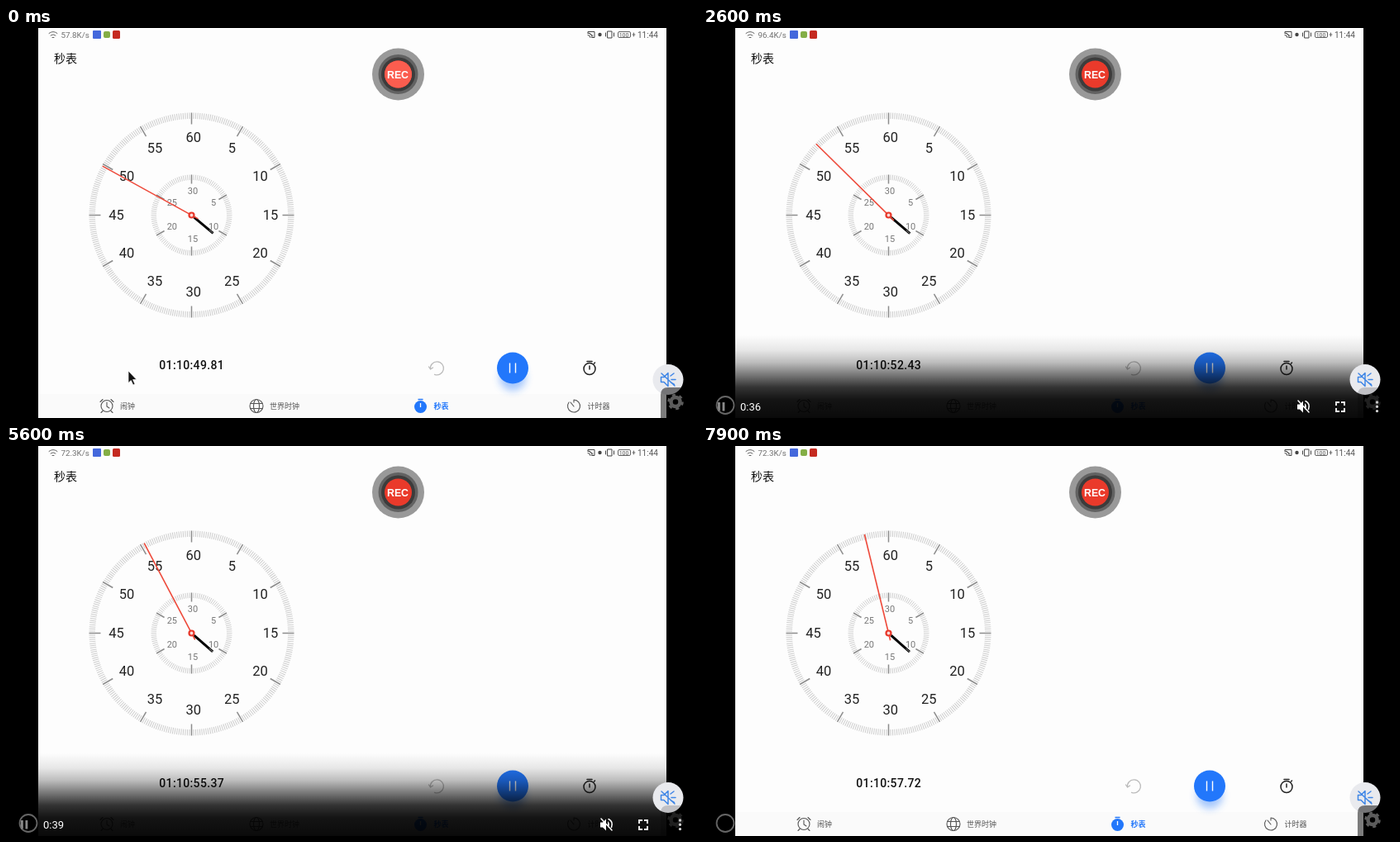
Animation, 836 px wide and 472 px high, one loop 8000 ms. Source, as an HTML page:

```html
<!DOCTYPE html>
<html lang="zh-CN">
<head>
<meta charset="utf-8">
<title>秒表</title>
<style>
html, body { margin: 0; width: 100%; height: 100%; overflow: hidden; background: #000; }
svg { display: block; width: 836px; height: 472px; font-family: Roboto, "Noto Sans CJK SC", sans-serif; }
.cjk { font-family: "Noto Sans CJK SC", "Noto Sans CJK", sans-serif; }
.mid { text-anchor: middle; }
.line { fill: none; stroke-linecap: round; stroke-linejoin: round; }
</style>
</head>
<body>
<svg viewBox="0 0 836 472">
  <defs>
    <linearGradient id="shade" x1="0" y1="0" x2="0" y2="1">
      <stop offset="0" stop-opacity="0"/>
      <stop offset=".18" stop-opacity=".09"/>
      <stop offset=".33" stop-opacity=".26"/>
      <stop offset=".48" stop-opacity=".53"/>
      <stop offset=".63" stop-opacity=".8"/>
      <stop offset=".78" stop-opacity=".92"/>
      <stop offset="1" stop-opacity=".96"/>
    </linearGradient>
    <filter id="blur" x="-50%" y="-50%" width="200%" height="200%"><feGaussianBlur stdDeviation="5"/></filter>
  </defs>
  <rect x="39" width="760" height="472" fill="#fdfdfd"/>
  <rect x="39" y="443" width="760" height="29" fill="#fafafa"/>

  <!-- status bar -->
  <g class="line" stroke="#666">
    <path d="M52 6.5q5-4 10 0M54 9q3-2.6 6 0"/>
    <path d="M56 11.5h2"/>
    <path d="M704 6V4.500h8v7h-3M704 8.500q3 0 3 3M704 6.300q5 0 5 5M706 6.500l4 3" stroke="#444"/>
    <path d="M728 4h5v8h-5zM725.500 6v4M735.500 6v4" stroke="#444"/>
    <rect x="740.500" y="4.500" width="15" height="7" rx="1.500"/>
    <path d="M759.500 6v4M758 8h3"/>
  </g>
  <circle cx="718.500" cy="8" r="2.200" fill="#444"/>
  <text x="741.700" y="11" font-size="7" fill="#555">100</text>
  <text id="speed" x="66.500" y="12" font-size="9.800" fill="#707070"></text>
  <rect x="105" y="3" width="10" height="10" rx="1" fill="#4468dc"/>
  <rect x="118" y="4" width="8" height="8" rx="2" fill="#84ae46"/>
  <rect x="129" y="3" width="9" height="10" rx="1.500" fill="#c52a20"/>
  <text x="764" y="12" font-size="10" fill="#555">11:44</text>

  <text class="cjk" x="58" y="42" font-size="14" font-weight="500" fill="#111">秒表</text>

  <!-- record badge -->
  <circle cx="474.500" cy="56" r="31.500" fill="#999"/>
  <circle cx="474.500" cy="56" r="24" fill="#626262"/>
  <circle cx="474.500" cy="56" r="20.500" fill="#3c3c3c"/>
  <circle cx="474.500" cy="56" r="16.500" fill="#ea3a2b"/>
  <circle id="glow" cx="474.500" cy="56" r="16.500" fill="#fb5d4f"/>
  <text class="mid" x="474" y="60.600" font-size="12.300" font-weight="700" fill="#fff" style="font-family:'Liberation Sans',sans-serif">REC</text>

  <!-- dial -->
  <g id="dial"></g>
  <g transform="translate(224.500 226.500)">
    <g id="minute"><path d="M0-4V-34" stroke="#000" stroke-width="3"/><path d="M0-28V-34" stroke="#777" stroke-width="1"/></g>
    <path id="second" d="M0 9V-123" stroke="#ee4a3b" stroke-width="1.600"/>
    <circle r="3" fill="#fbd9d6" stroke="#e8382b" stroke-width="2.200"/>
  </g>
  <text id="clock" class="mid" x="224.700" y="413" font-size="14" font-weight="500" letter-spacing=".35" fill="#111"></text>

  <!-- buttons -->
  <g class="line" stroke="#bbb" stroke-width="1.300">
    <path d="M513.500 413a8 8 0 1 1 5 6.300M511.500 410l2 3 3-2"/>
  </g>
  <circle cx="613" cy="423" r="16" fill="#2277fb" opacity=".4" filter="url(#blur)"/>
  <circle cx="613" cy="411.500" r="19" fill="#2277fb"/>
  <path d="M609.500 405.500v12M616.500 405.500v12" stroke="#fff" stroke-width="1.400"/>
  <g class="line" stroke="#222" stroke-width="1.500">
    <circle cx="706" cy="412.500" r="7"/><path d="M703 403.500h6M706 409v4M711.500 406l1-1"/>
  </g>

  <!-- tabs -->
  <g class="line" stroke="#555" stroke-width="1.100">
    <circle cx="122" cy="457.500" r="7"/><path d="M122 453v5l3 2M114 452.500l3-3M130 452.500l-3-3M117 463.500l-2 2M127 463.500l2 2"/>
    <circle cx="303" cy="457.500" r="8"/><ellipse cx="303" cy="457.500" rx="3.500" ry="8"/><path d="M296 454.500h14M296 460.500h14"/>
    <path d="M687 450a7.500 7.500 0 1 1-6 3M687 450v3M683 453l4 5"/>
  </g>
  <circle cx="501.500" cy="458.500" r="7.500" fill="#2277fb"/>
  <path d="M498.500 449.500h6" stroke="#2277fb" stroke-width="1.500"/>
  <path d="M501.500 454v5" stroke="#fff" stroke-width="1.300"/>
  <g class="cjk" font-size="9" fill="#555">
    <text x="138" y="461.300">闹钟</text><text x="319" y="461.300">世界时钟</text><text x="703.500" y="461.300">计时器</text>
    <text x="517.500" y="461.300" fill="#2277fb" font-weight="700">秒表</text>
  </g>

  <!-- player controls -->
  <g id="controls">
    <rect y="372" width="836" height="100" fill="url(#shade)"/>
    <path id="toggle" fill="#fff"/>
    <text id="played" x="45" y="463" font-size="13" fill="#fff"></text>
    <path d="M719 455.500h3l4-4v14l-4-4h-3zM728 454q4 4 0 8z" fill="#fff"/>
    <path class="line" d="M729 451.500q6 3 3.500 10M720 451l13 14" stroke="#fff" stroke-width="1.500"/>
    <path d="M766 457v-4h4M772 453h4v4M776 460v4h-4M770 464h-4v-4" fill="none" stroke="#fff" stroke-width="1.800"/>
    <path d="M815.500 453v.01M815.500 458.300v.01M815.500 463.600v.01" stroke="#fff" stroke-width="3.400" stroke-linecap="round"/>
  </g>

  <!-- floating buttons -->
  <circle cx="801" cy="425.500" r="18.500" fill="#e9eaee"/>
  <g class="line" stroke="#3f86e6" stroke-width="1.500">
    <path d="M792.500 422.500h3.500l5-5v16l-5-5h-3.500zM793 418l16 15M804 421l4-3M805 425.500h5M804.500 429l4 2.500"/>
  </g>
  <g id="gear">
    <path d="M792 472V444q0-9 9-9h35v37z" fill="#000" opacity=".5"/>
    <circle cx="810" cy="452.500" r="5.500" fill="none" stroke="#5c5c5c" stroke-width="4.500"/>
    <circle cx="810" cy="452.500" r="8.300" fill="none" stroke="#5c5c5c" stroke-width="3" stroke-dasharray="4 4.690"/>
  </g>

  <!-- pointer -->
  <path id="arrow" d="M0 0V14.500L3.300 11.500 5.800 17 8 16 5.500 10.600H10z" fill="#111" stroke="#fff" stroke-width=".7"/>
  <circle id="ripple" fill="none" stroke="#777" stroke-width="1.500"/>
  <circle id="ring" fill="#000" fill-opacity=".46" stroke="#787878" stroke-opacity=".85" stroke-width="1.800"/>
</svg>
<script>
const LOOP = 8000;
const $ = id => document.getElementById(id);
const set = (id, attrs) => { for (const k in attrs) $(id).setAttribute(k, attrs[k]); };

function dial(cx, cy, r, inner, major, ticks, tickWidth, num) {
  let out = '';
  for (let i = 0; i < ticks; i++) {
    const big = i % (ticks / num.count) === 0;
    out += `<path d="M0 ${-r}V${big ? -major : -inner}" stroke="${big ? '#8c8c8c' : '#cdcdcd'}"
      stroke-width="${big ? 1.5 : tickWidth}" transform="translate(${cx} ${cy}) rotate(${i * 360 / ticks})"/>`;
  }
  for (let i = 1; i <= num.count; i++) {
    const a = i * 2 * Math.PI / num.count;
    out += `<text class="mid" x="${num.x + num.r * Math.sin(a)}" y="${num.y - num.r * Math.cos(a) + num.size * .36}"
      font-size="${num.size}" fill="${num.fill}">${i * 5}</text>`;
  }
  return out;
}
$('dial').innerHTML =
  dial(224.5, 226.5, 124, 116.5, 110, 300, 1, { count: 12, x: 226.7, y: 225.7, r: 93.3, size: 16.5, fill: '#222' }) +
  dial(224.5, 226.5, 49, 42.5, 38, 120, .9, { count: 6, x: 226, y: 226, r: 29, size: 11, fill: '#777' });

// keys: [seconds, value...], linear in between
function at(keys, t) {
  let i = 1;
  while (i < keys.length - 1 && t > keys[i][0]) i++;
  const [a, b] = [keys[i - 1], keys[i]];
  const f = Math.min(1, Math.max(0, (t - a[0]) / (b[0] - a[0])));
  return a.slice(1).map((v, n) => v + (b[n + 1] - v) * f);
}

// the live picture halts while paused, then jumps ahead
const seconds = [[0, 49.81], [1, 50.84], [1.9, 51.72], [3.1, 52.93], [4.4, 52.93],
  [4.5, 54.27], [5.6, 55.37], [6, 55.84], [7.9, 57.72]];
const pointer = [[0, 148, 415, 9.5], [.8, 48, 460, 9.5], [1, 58.5, 458.5, 9.5],
  [1.9, 72.5, 448.5, 10.5], [2.5, 27, 456.5, 10.5]];
const fade = [[1.3, 0], [1.6, 1], [5.7, 1], [6, .22], [6.1, 0]];
const clicks = [3, 4.4, 7.3];
const PAUSE = 'M18 453h2.800v10.500H18zM23.500 453h2.800v10.500h-2.800z';
const PLAY = 'M18 452l10 6.300-10 6.300z';

function draw(t) {
  const [s] = at(seconds, t), [x, y, r] = at(pointer, t), [shown] = at(fade, t);
  const paused = t >= 3.1 && t < 4.5;
  $('clock').textContent = '01:10:' + s.toFixed(2);
  $('speed').textContent = (t < 2.6 ? '57.8' : t < 4.5 ? '96.4' : '72.3') + 'K/s';
  $('played').textContent = '0:' + Math.floor(s - 15.5);
  set('second', { transform: `rotate(${s * 6})` });
  set('minute', { transform: `rotate(${(10 + s / 60) * 12})` });
  set('glow', { opacity: Math.max(0, Math.cos(t / 2.1 * 2 * Math.PI) * 2 - 1) });
  set('toggle', { d: paused ? PLAY : PAUSE });
  set('controls', { opacity: shown });
  set('gear', { opacity: 1 - .65 * shown });

  const arrow = t < .4;
  set('arrow', { transform: `translate(${x} ${y})`, opacity: +arrow });
  set('ring', { cx: x, cy: y, r, opacity: +!arrow });
  const click = clicks.find(c => t >= c && t < c + .3);
  const p = click === undefined ? 1 : (t - click) / .3;
  set('ripple', { cx: x, cy: y, r: 11 + 12 * p, opacity: .6 * (1 - p) });
}

const start = performance.now();
function tick() {
  const ms = (performance.now() - start) % LOOP;
  draw(Math.floor(ms / 100) / 10);
  requestAnimationFrame(tick);
}
tick();
</script>
</body>
</html>
```
